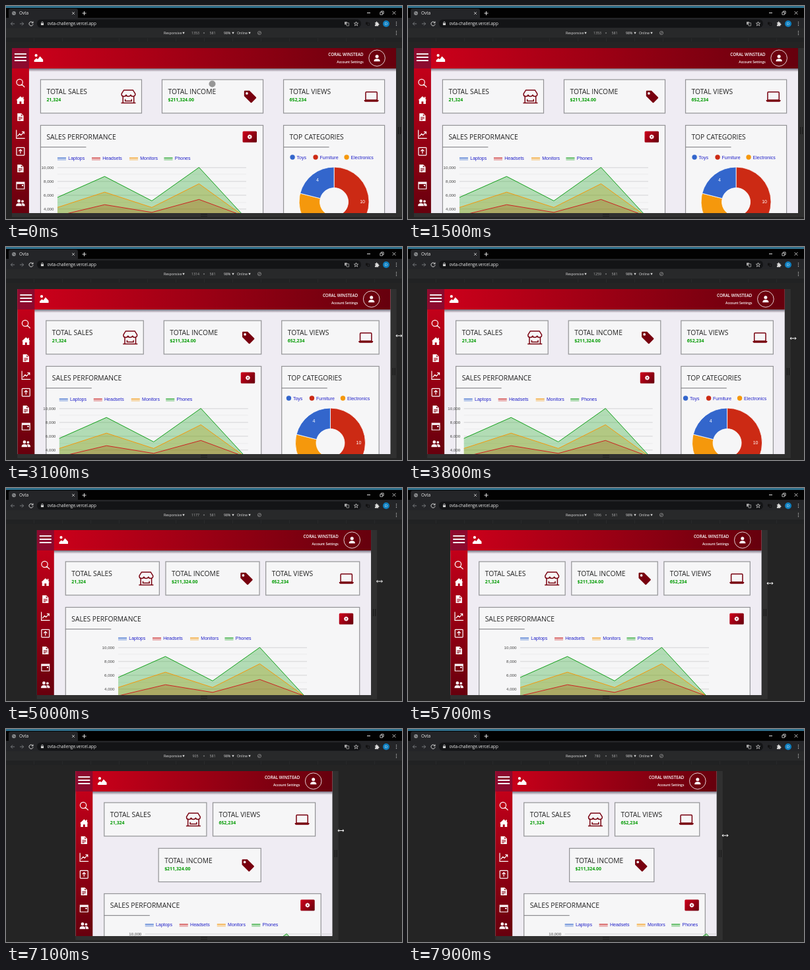
Recreate the animation shown at these times as an HTML page with a canvas. Size 600 px wide and 324 px high, loop 8000 ms.

```html
<!DOCTYPE html>
<html lang="en">
<head>
<meta charset="utf-8">
<title>Responsive dashboard</title>
<style>
html, body { margin: 0; width: 100%; height: 100%; overflow: hidden; background: #242424; }
canvas { display: block; }
</style>
</head>
<body>
<canvas id="stage" width="600" height="324"></canvas>
<script>
const ctx = document.getElementById('stage').getContext('2d');
const SANS = '"Open Sans", "Noto Sans", sans-serif';
const ARIAL = '"Liberation Sans", Arial, sans-serif';
const LOOP = 8000, SCALE = 0.4303, TOP = 64, BOTTOM = 315;
const BLUE = '#3366cc', RED = '#cc2a14', ORANGE = '#f5980c', GREEN = '#14a01c', MAROON = '#78000f';
const BRIGHT = '#d0001b', DARK = '#66000d';

// [time, viewport width] and [time, pointer height]
const WIDTHS = [[2650, 1353], [3100, 1314], [3800, 1259], [5000, 1177], [6400, 1014], [7900, 780]];
const POINTER_Y = [[2650, 134], [3100, 135], [3800, 139], [5000, 142], [6400, 148], [7900, 162]];

// Icons on a 16 unit grid
const ICONS = {
  search: { line: 'M12 6.5a5.5 5.5 0 1 1-11 0a5.5 5.5 0 1 1 11 0M10.5 10.5L15.5 15.5' },
  home: { fill: 'M8 1L11.5 4.3V2H13.5V6.2L15.5 8H14V15H9.7V10.5H6.3V15H2V8H.5Z' },
  doc: { fill: 'M2.5 1H9.5L13.5 5V15H2.5ZM4.5 7.5H11.5V8.7H4.5ZM4.5 9.8H11.5V11H4.5ZM4.5 12H8.5V13.2H4.5ZM9 2.3V5.5H12.2Z' },
  graph: { line: 'M.7 0V15.3H16M2.5 11.5L6.5 7L9 9.5L14.5 3.5M10.5 3.5H14.5V7.5' },
  upload: { line: 'M2 1H14Q15 1 15 2V14Q15 15 14 15H2Q1 15 1 14V2Q1 1 2 1ZM8 12V4.5M5 7.5L8 4.5L11 7.5' },
  wallet: { line: 'M1 2H15V14H1Z', fill: 'M1 2H15V5H1ZM10.5 6.5H13V9H10.5Z' },
  people: { fill: 'M8 5a2.8 2.8 0 1 1-5.6 0a2.8 2.8 0 1 1 5.6 0M0 14Q0 9 5.2 9T10.4 14ZM14 5.5a2.3 2.3 0 1 1-4.6 0a2.3 2.3 0 1 1 4.6 0M11.4 14Q11.4 11 9.7 9.2Q16 8 16 14Z' },
  user: { fill: 'M11.5 4.5a3.5 3.5 0 1 1-7 0a3.5 3.5 0 1 1 7 0M1.5 15Q1.5 9.3 8 9.3T14.5 15Z' },
  image: { fill: 'M6 3.5a2.5 2.5 0 1 1-5 0a2.5 2.5 0 1 1 5 0M0 15V12L4 8.5L6.5 10.5L10.5 5L16 11V15Z' },
  shop: { line: 'M3 1H13L15.5 5V6A2.5 2 0 0 1 10.5 6A2.5 2 0 0 1 5.5 6A2.5 2 0 0 1 .5 6V5ZM2 8.2V15M14 8.2V15M0 15.2H16M4.5 11V13H11.5V11' },
  tag: { fill: 'M1 2Q1 1 2 1H7.5L15.5 9Q16 9.6 15.5 10.2L10.2 15.5Q9.6 16 9 15.5L1 7.5ZM5.8 4.3a1.5 1.5 0 1 0-3 0a1.5 1.5 0 1 0 3 0' },
  laptop: { line: 'M2.5 3H13.5Q14.3 3 14.3 4V12H1.7V4Q1.7 3 2.5 3Z', fill: 'M0 12H16Q16 14 14.5 14H1.5Q0 14 0 12Z' },
  lock: { line: 'M4.5 7V5Q4.5 1.5 8 1.5T11.5 5V7', fill: 'M2.5 7H13.5V15H2.5Z' },
  left: { line: 'M15 8H2M8 2L2 8L8 14' },
  right: { line: 'M1 8H14M8 2L14 8L8 14' },
  reload: { line: 'M13.5 5A6.2 6.2 0 1 0 14.2 9M14 1V5.5H9.5' },
  rotate: { line: 'M14 8a6 6 0 1 1-12 0a6 6 0 1 1 12 0M5 10L10 5L11 6L6 11Z' },
  star: { line: 'M8 1L10 6H15L11 9.5L12.5 15L8 11.5L3.5 15L5 9.5L1 6H6Z' },
  puzzle: { fill: 'M1 4H5Q4 0 7 0T9 4H13V8Q16 7 16 10T13 12V16H1V11Q4 11 4 9T1 7Z' },
  pages: { fill: 'M0 1H9V4H6V11H0Z', line: 'M7 5H15V15H7Z' },
  restore: { line: 'M1 5H11V15H1ZM5 5V1H15V11H11' },
  resize: { line: 'M2 8H14M4 5.5L1 8L4 10.5M12 5.5L15 8L12 10.5' }
};
for (const icon of Object.values(ICONS))
  for (const kind in icon) icon[kind] = new Path2D(icon[kind]);

function track(points, t) {
  if (t <= points[0][0]) return points[0][1];
  for (let i = 1; i < points.length; i++) {
    const [t0, a] = points[i - 1], [t1, b] = points[i];
    if (t <= t1) return a + (b - a) * (t - t0) / (t1 - t0);
  }
  return points.at(-1)[1];
}

function rect(x, y, w, h, color) {
  ctx.fillStyle = color;
  ctx.fillRect(x, y, w, h);
}

function round(x, y, w, h, r, color) {
  ctx.fillStyle = color;
  ctx.beginPath();
  ctx.roundRect(x, y, w, h, r);
  ctx.fill();
}

function disc(x, y, r, color) {
  ctx.fillStyle = color;
  ctx.beginPath();
  ctx.arc(x, y, r, 0, 7);
  ctx.fill();
}

function line(points, color, width = 1) {
  ctx.strokeStyle = color;
  ctx.lineWidth = width;
  ctx.beginPath();
  points.forEach(p => ctx.lineTo(...p));
  ctx.stroke();
}

function cross(x, y, r, color) {
  line([[x - r, y - r], [x + r, y + r]], color, 0.8);
  line([[x + r, y - r], [x - r, y + r]], color, 0.8);
}

function text(s, x, y, font, color, align = 'left') {
  ctx.font = font;
  ctx.fillStyle = color;
  ctx.textAlign = align;
  ctx.fillText(s, x, y);
}

function icon(name, x, y, size, color, weight = 1) {
  const { fill, line } = ICONS[name], k = size / 16;
  ctx.save();
  ctx.translate(x - size / 2, y - size / 2);
  ctx.scale(k, k);
  ctx.fillStyle = ctx.strokeStyle = color;
  ctx.lineWidth = weight / k;
  if (fill) ctx.fill(fill, 'evenodd');
  if (line) ctx.stroke(line);
  ctx.restore();
}

function gradient(x0, y0, x1, y1, from, to) {
  const g = ctx.createLinearGradient(x0, y0, x1, y1);
  g.addColorStop(0, from);
  g.addColorStop(1, to);
  return g;
}

function dots(x, y) {
  for (const d of [-2.5, 0, 2.5]) disc(x, y + d, 0.7, '#bbb');
}

function browser(width) {
  rect(0, 0, 600, 324, '#242424');
  rect(0, 0, 600, 3, '#2f6f8c');
  rect(0, 3, 600, 15, '#020202');
  round(4, 4, 105, 16, 3, '#242528');
  rect(0, 18, 600, 16, '#242528');
  disc(12, 11, 3, '#888a8d');
  line([[10, 10], [14, 12]], '#444', 0.8);
  text('Ovta', 20, 13.3, '6.5px ' + SANS, '#e8e8e8');
  cross(102, 11, 2, '#ccc');
  line([[115.5, 11], [121.5, 11]], '#ddd');
  line([[118.5, 8], [118.5, 14]], '#ddd');
  line([[547, 10.5], [552, 10.5]], '#ddd');
  icon('restore', 569.5, 10.5, 6, '#ddd', 0.8);
  cross(588, 10.5, 2.5, '#ddd');

  icon('left', 10, 27, 7, '#77797c');
  icon('right', 24, 27, 7, '#77797c');
  icon('reload', 38, 27, 8, '#d5d5d5');
  round(47, 20.5, 491, 12.5, 6, '#131416');
  icon('lock', 55, 26.5, 6, '#d5d5d5', 0.8);
  text('ovta-challenge.vercel.app', 62.5, 29, '6.3px ' + SANS, '#f0f0f0');
  icon('pages', 516.5, 27, 7, '#aaa', 0.8);
  icon('star', 530.5, 27, 7, '#ccc', 0.8);
  icon('pages', 548, 27, 6, '#111');
  icon('puzzle', 562, 27, 7, '#ddd');
  disc(576, 27, 5, '#0f7fc0');
  text('D', 576, 29, '5.5px ' + SANS, '#fff', 'center');
  dots(591.5, 27);

  rect(0, 34, 600, 14, '#28292a');
  const small = '5.2px ' + SANS;
  [['Responsive', 239, 269], ['98%', 330, 344], ['Online', 350, 369]].forEach(([s, x, arrow]) => {
    text(s, x, 43, small, '#e2e2e2');
    ctx.beginPath();
    ctx.moveTo(arrow - 1.7, 39.7);
    ctx.lineTo(arrow + 1.7, 39.7);
    ctx.lineTo(arrow, 42.7);
    ctx.fill();
  });
  text(width, 287, 43, small, '#aaa', 'center');
  text('×', 300, 43, small, '#aaa', 'center');
  text('581', 313, 43, small, '#aaa', 'center');
  icon('rotate', 384, 41, 7, '#888', 0.8);
  dots(591.5, 41);

  rect(0, 48, 600, 7, '#212223');
  for (let x = 300 % 43.03; x < 600; x += 43.03) rect(x, 49, 1, 5, '#2a2b2c');
}

function resizers(x, w) {
  const right = x + w;
  rect(right, TOP, 9, BOTTOM - TOP + 6, '#303030');
  rect(x, BOTTOM, w, 6, '#303030');
  for (const d of [-1.5, 1.5]) {
    rect(right + 4.5 + d, 184, 1, 11, '#151515');
    rect(295, 318 + d, 10, 0.8, '#151515');
  }
}

function card(x, y, w, h) {
  rect(x, y, w, h, '#f6f6f7');
  ctx.strokeStyle = '#929295';
  ctx.lineWidth = 1.2;
  ctx.strokeRect(x + 0.5, y + 0.5, w - 1, h - 1);
}

function title(s, x, y) {
  text(s, x + 9.5, y, '10.3px ' + SANS, '#222');
}

function stat(name, value, glyph, x, y, w) {
  card(x, y, w, 52);
  title(name, x, y + 22.5);
  text(value, x + 9.5, y + 33.5, 'bold 6.9px ' + SANS, '#009a00');
  icon(glyph, x + w - 20.5, y + 26, glyph === 'tag' ? 20 : 22, MAROON, 1.5);
}

function panel(name, x, y, w) {
  card(x, y, w, 200);
  title(name, x, y + 22);
  rect(x, y + 33, 69.5, 1.2, '#8c8c8f');
}

function gear(x, y) {
  round(x, y, 21.5, 17, 1.5, gradient(x, y, x + 21, y + 17, BRIGHT, DARK));
  ctx.save();
  ctx.translate(x + 10.7, y + 8.5);
  for (let i = 0; i < 4; i++) {
    rect(-0.8, -3.4, 1.6, 6.8, '#fff');
    ctx.rotate(Math.PI / 4);
  }
  ctx.restore();
  disc(x + 10.7, y + 8.5, 2.5, '#fff');
  disc(x + 10.7, y + 8.5, 1, '#90000f');
}

// x, y: left end of the plot and top of its panel content
function areaChart(x, y) {
  const level = v => y + 64.5 + (10000 - v) * 0.0106;
  const step = 71.5, right = x + step * 4;
  for (let v = 10000; v >= 0; v -= 1000) {
    rect(x, Math.round(level(v)) - 0.5, right - x, 0.8, v % 2000 ? '#e9e9ea' : '#cbcbcc');
    if (v % 2000 === 0)
      text(v.toLocaleString('en-US'), x - 5.5, level(v) + 2.2, '6.2px ' + ARIAL, '#444', 'right');
  }
  const series = [
    ['Laptops', 0, BLUE, [1000, 1170, 660, 1030, 900]],
    ['Headsets', 52, '#cc2222', [3050, 4650, 3550, 5400, 2900]],
    ['Monitors', 109, ORANGE, [4250, 6450, 4250, 7650, 2750]],
    ['Phones', 161.5, GREEN, [5700, 8700, 5200, 10000, 2650]]
  ].map(([name, dx, color, values]) =>
    ({ name, left: x + dx, color, points: values.map((v, i) => [x + i * step, level(v)]) }));

  ctx.globalAlpha = 0.3;
  for (const { color, left, points } of series) {
    ctx.beginPath();
    [...points, [right, level(0)], [x, level(0)]].forEach(p => ctx.lineTo(...p));
    ctx.fillStyle = color;
    ctx.fill();
    rect(left, y + 50, 13, 4, color);
  }
  ctx.globalAlpha = 1;
  for (const { name, color, left, points } of series) {
    line(points, color, 1);
    rect(left, y + 49.5, 13, 1, color);
    text(name, left + 16.3, y + 53.3, '7px ' + ARIAL, '#2020c8');
  }
}

function donut(cx, y) {
  [['Toys', -63, BLUE], ['Furniture', -28, RED], ['Electronics', 19, ORANGE]].forEach(([name, dx, color]) => {
    disc(cx + dx, y + 49, 3.7, color);
    text(name, cx + dx + 6.5, y + 51.8, '7px ' + ARIAL, '#2020c8');
  });
  const cy = y + 117, total = 19;
  let start = -Math.PI / 2;
  [[10, RED], [5, ORANGE], [4, BLUE]].forEach(([n, color]) => {
    const end = start + n / total * Math.PI * 2;
    ctx.beginPath();
    ctx.arc(cx, cy, 53, start, end);
    ctx.arc(cx, cy, 21.5, end, start, true);
    ctx.closePath();
    ctx.fillStyle = color;
    ctx.fill();
    ctx.strokeStyle = '#fff';
    ctx.lineWidth = 0.8;
    ctx.stroke();
    start = end;
  });
  text('10', cx + 43, cy + 2, '7px ' + ARIAL, '#fff', 'center');
  text('4', cx - 25, cy - 31, '7px ' + ARIAL, '#fff', 'center');
}

function content(x, w, width) {
  const left = x + 43, inner = w - 60, wide = width >= 1200, narrow = width < 992;
  const sales = ['TOTAL SALES', '21,324', 'shop'];
  const income = ['TOTAL INCOME', '$211,324.00', 'tag'];
  const views = ['TOTAL VIEWS', '652,234', 'laptop'];
  const gap = wide ? 30 : 8.6, col = (inner - 2 * gap) / 3;
  let y = 181;
  if (narrow) {
    const half = inner / 2;
    stat(...sales, left, 111.5, half - gap);
    stat(...views, left + half, 111.5, half - gap);
    stat(...income, left + half / 2, 181, half - gap);
    y = 250;
  } else {
    [sales, income, views].forEach((s, i) => stat(...s, left + i * (col + gap), 111.5, col));
  }

  const chartW = wide ? col * 2 + gap : inner;
  panel('SALES PERFORMANCE', left, y, chartW);
  gear(left + chartW - 31.5, y + 9.5);
  areaChart(narrow ? left + 62.5 : left + chartW / 2 - 143, wide ? y : y - 3);
  if (wide) {
    const third = left + 2 * (col + gap);
    panel('TOP CATEGORIES', third, y, col);
    donut(third + col / 2, y);
  }
}

function chrome(x, w) {
  const right = x + w;
  rect(x, 95, w, 5, gradient(0, 95, 0, 100, 'rgba(40,30,50,.6)', 'rgba(40,30,50,0)'));
  rect(x, TOP, 26, BOTTOM - TOP, gradient(x, TOP, x + 26, BOTTOM, BRIGHT, DARK));
  ['search', 'home', 'doc', 'graph', 'upload', 'doc', 'wallet', 'people'].forEach((name, i) =>
    icon(name, x + 13, 117.2 + i * 26, 13.5, '#fff', 1.2));
  rect(x, TOP, w, 31, gradient(x, TOP, right, TOP + 31, BRIGHT, DARK));
  rect(x, TOP, 26, 31, 'rgba(50,25,75,.42)');
  for (const y of [72, 77, 82]) rect(x + 4, y, 18, 2, '#f4eef2');
  icon('image', x + 40.5, 79, 13.5, '#fff');
  text('CORAL WINSTEAD', right - 49.5, 76.3, '600 6.2px ' + SANS, '#fff', 'right');
  text('Account Settings', right - 49.5, 87, '600 5px ' + SANS, '#fff', 'right');
  ctx.strokeStyle = '#f0e4e6';
  ctx.lineWidth = 0.9;
  ctx.beginPath();
  ctx.arc(right - 29, 79.2, 12.3, 0, 7);
  ctx.stroke();
  icon('user', right - 29, 79.2, 11.5, '#fff');
}

function draw(now) {
  const t = Math.floor(now % LOOP / 100) * 100;
  const width = Math.round(track(WIDTHS, t));
  const w = width * SCALE, x = 300 - w / 2;
  browser(width);
  resizers(x, w);

  ctx.save();
  ctx.beginPath();
  ctx.rect(x, TOP, w, BOTTOM - TOP);
  ctx.clip();
  rect(x, TOP, w, BOTTOM - TOP, '#efecf3');
  content(x, w, width);
  chrome(x, w);
  // Touch pointer leaves to the right before the drag
  const k = t / 900;
  if (k < 1) {
    ctx.globalAlpha = 0.85;
    disc(312.5 + 292 * k * k * (3 - 2 * k), 118.5 + 16 * k, 5, '#858585');
    ctx.globalAlpha = 1;
  }
  ctx.restore();

  if (t > WIDTHS[0][0]) icon('resize', x + w + 12.7, track(POINTER_Y, t), 10.5, '#fff', 1);
}

function loop() {
  draw(performance.now());
  requestAnimationFrame(loop);
}
loop();
</script>
</body>
</html>
```
